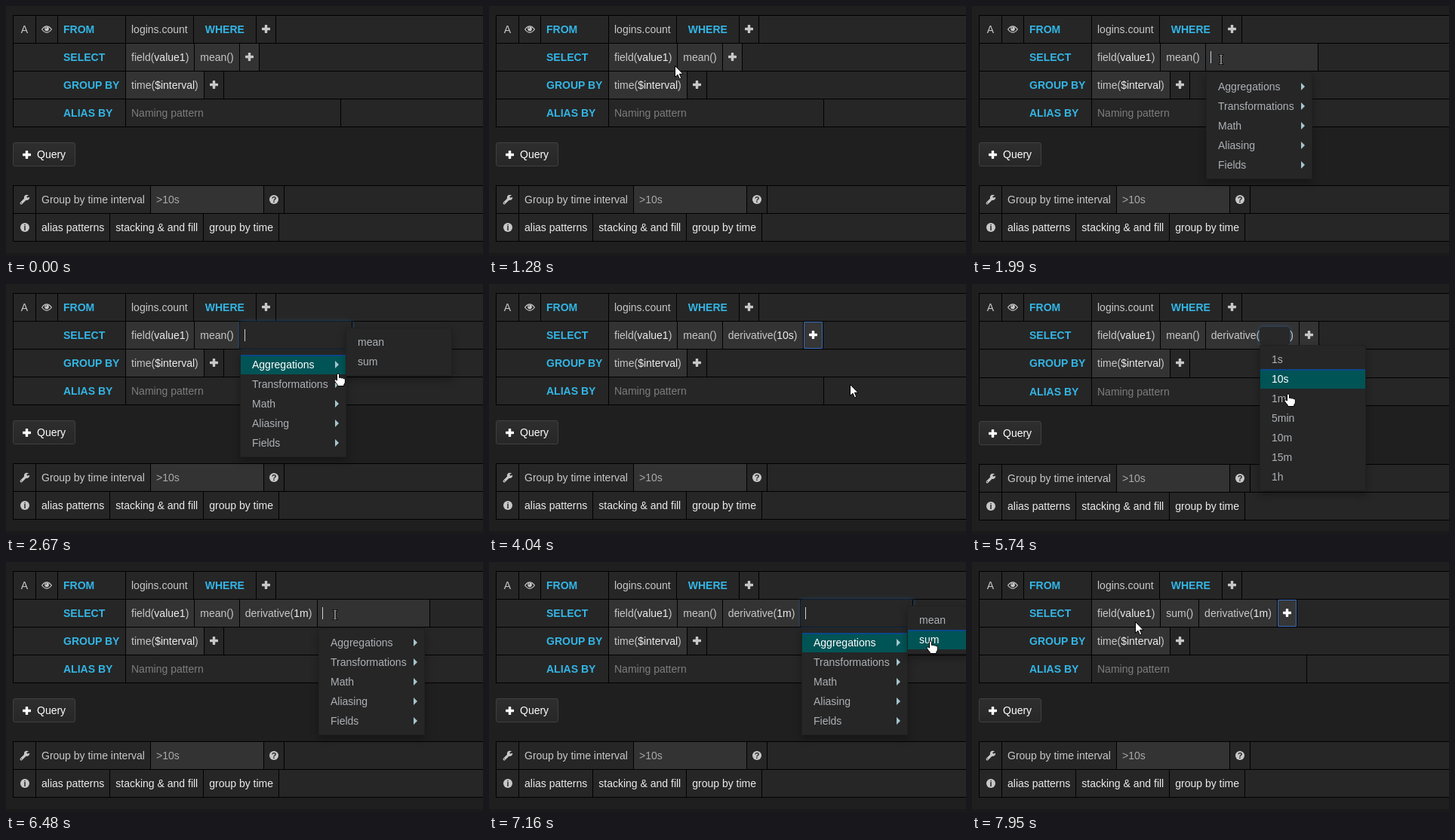
An HTML page for the animation above (7.99 s loop, 632 by 332 pixels).

```html
<!DOCTYPE html>
<html lang="en">
<meta charset="utf-8">
<title>Query editor</title>
<style>
html, body { margin: 0; height: 100%; overflow: hidden; background: #1f1f1f; }
body { font: 14px "Liberation Sans", Arial, sans-serif; color: #c8c8c8; }
#stage { position: relative; width: 632px; height: 332px; overflow: hidden; --s: 0px; --g: 0; }
#stage > *, #low > * { position: absolute; }
#low { left: 0; top: var(--s); }
.row { left: 9px; width: 640px; height: 36px; line-height: 36px; display: flex;
  border: solid #000; border-width: 1px 0 1px 1px; background: #262626; }
#group { height: calc(36px + var(--s)); }
.row > * { flex: none; box-sizing: border-box; padding: 0 7px; border-right: 1px solid #000; white-space: pre; }
.row > .icon { width: 30px; padding: 0; text-align: center; }
.row > b { width: 149px; padding-left: 66px; color: #33b5e5; }
.row > .icon ~ b { width: 90px; padding-left: 7px; }
.row > .where { width: auto !important; padding: 0 15px !important; }
.f { background: #333; }
.f i, .link { font-style: normal; color: #ececec; }
.on { box-shadow: inset 0 0 0 1px #3a6fc4; border-radius: 2px; color: #fff; background: #363636; }
svg { vertical-align: middle; fill: currentColor; overflow: visible; }
.plus { margin-top: -3px; }
.input { width: 149px; position: relative;
  background: rgb(calc(50 - 11 * var(--g)), calc(50 - 11 * var(--g)), calc(50 - 11 * var(--g))); }
.input, .param { box-shadow: 0 0 5px rgba(40, 105, 175, calc(var(--g) * .65)); }
.caret::before { content: ""; position: absolute; left: 6px; top: 10px; width: 1px; height: 16px; background: #c8d0d8; }
.param { display: inline-block; width: 40px; height: 24px; vertical-align: middle; border-radius: 4px; background: #282828; }
#query { left: 9px; top: 181px; width: 81px; height: 30px; line-height: 30px; border: 1px solid #404040;
  border-radius: 3px; background: linear-gradient(#2e2e2e, #272727); color: #fff; }
#query svg { margin: -2px 8px 0 12px; }
.menu { position: absolute; width: 139px; padding: 5px 0; border: 1px solid #212121; background: #262626;
  box-shadow: 0 5px 10px rgba(0, 0, 0, .3); color: #adb1b6; }
.menu div { position: relative; height: 26px; line-height: 26px; padding-left: 15px; }
.menu .hot { background: #005456; color: #fff; box-shadow: inset 0 2px #0b4788; }
.arrow div::after { content: ""; position: absolute; right: 9px; top: 8px;
  border: solid transparent; border-width: 5px 0 5px 5px; border-left-color: #a5c5cd; }
#band { left: 0; bottom: 0; width: 100%; height: 4px; background: #1a1a1a; }
#cursor { left: 0; top: 0; width: 1px; height: 1px; }
#cursor path { fill: #fff; stroke: #000; stroke-width: 1; stroke-linejoin: round; }
</style>
<div id="stage">
  <div class="row" style="top:12px">
    <span class="icon">A</span><span class="icon" style="width:29px"><svg width="14" height="10" viewBox="0 0 14 10" style="margin-top:-2px"><path d="M.6 5Q7-3.4 13.4 5Q7 13.4 .6 5Z" fill="none" stroke="currentColor" stroke-width="1.2"/><circle cx="7" cy="4.4" r="2.8"/><path d="M5.6 4.2Q5.7 3 7 2.9" fill="none" stroke="#262626"/></svg></span><b>FROM</b><span>logins.count</span><b class="where">WHERE</b><span data-plus></span>
  </div>
  <div class="row" id="group" style="top:86px"><b>GROUP BY</b><span class="f">time(<i>$interval</i>)</span><span data-plus></span></div>
  <div id="low">
    <div class="row" style="top:123px"><b>ALIAS BY</b><span style="width:285px;color:#7d7d7d">Naming pattern</span></div>
    <div id="query"><span data-plus></span>Query</div>
    <div class="row" style="top:238px">
      <span class="icon"><svg width="14" height="14" viewBox="0 0 14 14" style="margin-top:-2px"><path d="M2.2 11.8L8 6" stroke="currentColor" stroke-width="3.2" stroke-linecap="round"/><path d="M10.6 1.5A3 3 0 1 0 12.5 4.6L10.6 5.2L8.8 4.3V2.5Z" stroke="currentColor" stroke-width="1.2"/><circle cx="2.4" cy="11.6" r=".7" fill="#262626"/></svg></span><span>Group by time interval</span><span class="f" style="width:150px;color:#a8a8a8">&gt;10s</span><span data-dot="?"></span>
    </div>
    <div class="row" style="top:275px">
      <span class="icon" data-dot="i"></span><span class="link">alias patterns</span><span class="link">stacking &amp; and fill</span><span class="link">group by time</span>
    </div>
  </div>
  <div class="row" id="select" style="top:49px"></div>
  <div id="band"></div>
  <div id="pop" style="left:0;top:0"></div>
  <svg id="cursor"><path/></svg>
</div>
<script>
const $ = id => document.getElementById(id);
const PLUS = '<svg class="plus" width="11" height="11"><path d="M4.5 0h2q.7 0 .7.7V3.8h3.1q.7 0 .7.7v2q0 .7-.7.7H7.2v3.1q0 .7-.7.7h-2q-.7 0-.7-.7V7.2H.7Q0 7.2 0 6.5v-2q0-.7.7-.7H3.8V.7Q3.8 0 4.5 0z"/></svg>';
document.querySelectorAll('[data-plus]').forEach(e => e.innerHTML = PLUS);
document.querySelectorAll('[data-dot]').forEach(e => e.innerHTML =
  `<svg width="12" height="12" style="margin-top:-2px"><circle cx="6" cy="6" r="6"/><text x="6" y="9.8" text-anchor="middle" font-size="11" font-weight="bold" style="fill:#262626">${e.dataset.dot}</text></svg>`);

const LOOP = 7990;
const SHAPES = {
  arrow: 'M.5 .5V15.5L4 12.2L6.4 17.8L8.8 16.8L6.4 11.3H11Z',
  hand: 'M-1.5 9V1.2Q-1.5 0 0 0T1.5 1.2V5.5Q3.5 4.4 4.4 6Q6.3 5 7.1 6.6Q9.3 5.8 9.4 8V11Q9.4 13 7.8 14.3V16.5H-.8V14.8Q-3 12.5-4.8 9.5Q-5.2 7.4-3.3 7.8Z',
  beam: 'M-3-6.5H-1L0-5.5L1-6.5H3V-5H1V5H3V6.5H1L0 5.5L-1 6.5H-3V5H-1V-5H-3Z'
};
// time, hotspot x, y, pointer shape until the next key
const PATH = [
  [660, 332, 66, 'hand'], [700, 328, 67, 'arrow'], [1280, 246, 79, 'arrow'], [1440, 258, 73, 'arrow'],
  [1600, 320, 65, 'hand'], [1680, 334, 63, 'hand'], [1800, 326, 70, 'hand'], [1950, 326, 70, 'beam'],
  [2160, 345, 76, 'beam'], [2320, 385, 92, 'hand'], [2470, 415, 106, 'hand'], [2670, 440, 119, 'hand'],
  [2710, 440, 126, 'hand'], [2830, 436, 134, 'hand'], [3260, 436, 134, 'hand'], [3420, 477, 132, 'hand'],
  [3680, 477, 132, 'hand'], [3690, 478, 133, 'hand'], [4000, 478, 133, 'arrow'], [4390, 478, 133, 'arrow'],
  [4800, 404, 75, 'hand'], [4960, 394, 69, 'hand'], [5000, 394, 69, 'beam'], [5200, 396, 74, 'beam'],
  [5320, 402, 88, 'hand'], [5740, 419, 146, 'hand'], [5810, 418, 149, 'hand'], [5930, 418, 150, 'arrow'],
  [6030, 419, 148, 'arrow'], [6280, 428, 84, 'hand'], [6380, 430, 71, 'hand'], [6420, 432, 70, 'beam'],
  [6480, 436, 70, 'beam'], [6560, 440, 72, 'beam'], [6760, 480, 88, 'hand'], [6840, 500, 104, 'hand'],
  [6920, 530, 110, 'hand'], [7000, 558, 107, 'hand'], [7160, 585, 105, 'hand'], [7490, 585, 105, 'arrow'],
  [7950, 216, 79, 'arrow'], [LOOP, 216, 79, 'arrow']
];
const KINDS = ['Aggregations', 'Transformations', 'Math', 'Aliasing', 'Fields'];
const SUBS = [['mean', 'sum'], ['stddev', 'derivative']];
const SPANS = ['1s', '10s', '1m', '5min', '10m', '15m', '1h'];

const fn = (name, arg = '') => `<span class="f">${name}(<i>${arg}</i>)</span>`;
const plus = (on = false) => `<span class="f ${on ? 'on' : ''}">${PLUS}</span>`;
const input = caret => `<span class="input ${caret ? 'caret' : ''}"></span>`;
const menu = (x, y, items, hot, cls = '') => `<div class="menu ${cls}" style="left:${x}px;top:${y}px">` +
  items.map((s, i) => `<div class="${i === hot ? 'hot' : ''}">${s}</div>`).join('') + '</div>';
const tree = (x, kind, sub) => menu(x, 88, KINDS, kind, 'arrow') +
  (kind < 0 ? '' : menu(x + 140, 58 + 26 * kind, SUBS[kind], sub));

// Contents of the SELECT row and of the popup, plus the time the field got focus
function view(t) {
  if (t < 1950) return { row: fn('mean') + plus() };
  if (t < 4000) return {
    row: fn('mean') + input(t < 3850), open: 1950,
    pop: tree(310, t < 2340 ? -1 : t < 3260 ? 0 : 1, t >= 3330 && t < 3850 ? 1 : -1)
  };
  if (t < 5000) return { row: fn('mean') + fn('derivative', '10s') + plus(true) };
  if (t < 5930) return {
    row: fn('mean') + fn('derivative', '<span class="param"></span>') + plus(), open: 5000, shift: true,
    pop: menu(381, 81, SPANS, t < 5810 ? 1 : 2)
  };
  if (t < 6420) return { row: fn('mean') + fn('derivative', '1m') + plus() };
  if (t < 7490) return {
    row: fn('mean') + fn('derivative', '1m') + input(true), open: 6420,
    pop: tree(414, t < 6840 ? -1 : 0, t < 6990 ? -1 : 1)
  };
  return { row: fn('sum') + fn('derivative', '1m') + plus(true) };
}

function fill(el, html) {
  if (el.html !== html) el.innerHTML = el.html = html;
}

function drawCursor(t) {
  const i = PATH.findIndex(k => k[0] > t);
  $('cursor').style.display = i > 0 ? '' : 'none';
  if (i < 1) return;
  const [t0, x0, y0, kind] = PATH[i - 1], [t1, x1, y1] = PATH[i];
  const p = (t - t0) / (t1 - t0);
  const x = Math.round(x0 + (x1 - x0) * p), y = Math.round(y0 + (y1 - y0) * p);
  $('cursor').style.transform = `translate(${x}px,${y}px)`;
  $('cursor').firstElementChild.setAttribute('d', SHAPES[kind]);
}

function frame(now) {
  const t = now % LOOP, { row, pop = '', open, shift } = view(t);
  fill($('select'), '<b>SELECT</b>' + fn('field', 'value1') + row);
  fill($('pop'), pop);
  const glow = open ? Math.min(1, Math.max(0, (t - open - 60) / 200)) : 0;
  $('stage').style.setProperty('--g', glow);
  $('stage').style.setProperty('--s', shift ? '1px' : '0px');
  drawCursor(t);
  requestAnimationFrame(frame);
}
const start = performance.now();
requestAnimationFrame(() => frame(0));
function frameAt() { return performance.now() - start; }
</script>
</div>
</html>
```
